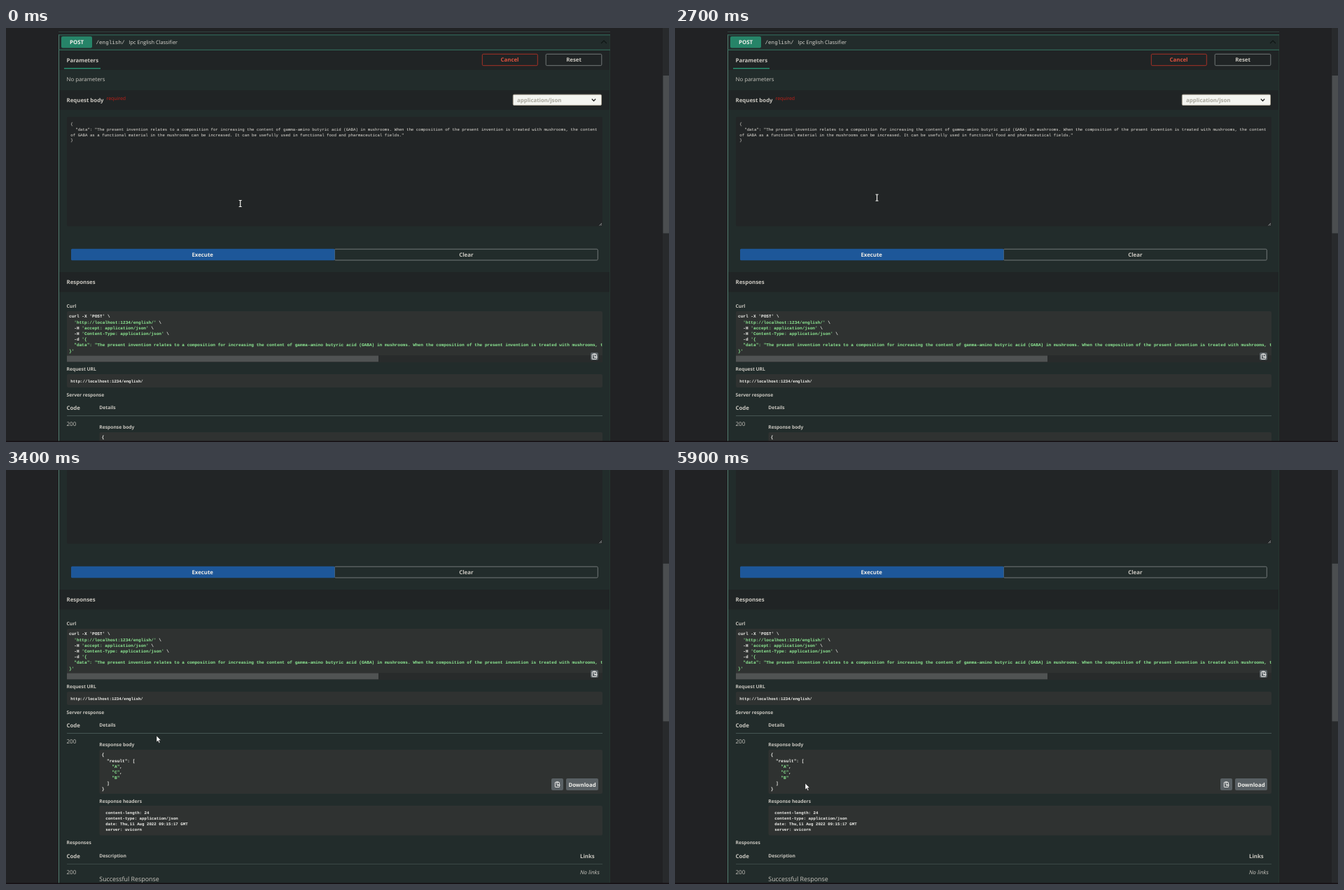
An HTML page with a canvas for the animation above (6000 ms loop, 947 px wide and 592 px high).

```html
<!DOCTYPE html>
<html lang="en">
<head>
<meta charset="utf-8">
<title>API docs</title>
<style>
html, body { margin: 0; width: 100%; height: 100%; overflow: hidden; background: #212224; }
canvas { display: block; width: 947px; height: 592px; }
</style>
</head>
<body>
<canvas id="stage" width="947" height="592"></canvas>
<script>
const ctx = document.getElementById('stage').getContext('2d');
const LOOP = 6000, STEP = 100;
const UI = '"Open Sans", "Noto Sans", sans-serif';
const MONO = '"Liberation Mono", "DejaVu Sans Mono", monospace';
const INK = '#c9c6bf', GREEN = '#8eea94', WHITE = '#f2f2ee', PANEL = '#2f3231';
const CODE = 6.11, PLAIN = 5.75, CHAR = CODE * 0.6, LINE = 8.17;

const abstract = ['The present invention relates to a composition for increasing the content of',
  'gamma-amino butyric acid (GABA) in mushrooms. When the composition of the present',
  'invention is treated with mushrooms, the content'].join(' ');
const bodyLines = ['{', '  "data": "' + abstract,
  'of GABA as a functional material in the mushrooms can be increased. It can be usefully used in functional food and pharmaceutical fields."',
  '}'];
// Each code line is a white part followed by a green part and a white tail.
const curlLines = [
  ["curl -X 'POST' \\"],
  ['  ', "'http://localhost:1234/english/'", ' \\'],
  ['  -H ', "'accept: application/json'", ' \\'],
  ['  -H ', "'Content-Type: application/json'", ' \\'],
  ['  -d ', "'{"],
  ['', '  "data": "' + abstract],
  ['', "}'"]
];
const resultLines = [['{'], ['  "result": ['], ['    ', '"A"', ','], ['    ', '"C"', ','],
  ['    ', '"B"'], ['  ]'], ['}']];
const headerLines = ['content-length: 24', 'content-type: application/json',
  'date: Thu,11 Aug 2022 09:15:17 GMT', 'server: uvicorn'];

const scrollKeys = [[2700, 0], [3100, 99.5], [3300, 178]];
const pointerKeys = [[400, 334.7, 251], [1300, 288.5, 328], [2000, 288.5, 328], [2500, 288.5, 242.6],
  [3100, 288.5, 242.6], [3400, 215, 380], [4100, 139, 408], [4200, 139, 408], [4500, 163, 440],
  [4900, 146, 456], [5200, 146, 456], [5700, 186, 448]];
const selectKeys = [[4200, 0], [4500, 21], [4900, 47]];

function track(keys, t) {
  const next = keys.findIndex(k => k[0] >= t);
  if (next === 0) return keys[0].slice(1);
  if (next < 0) return keys[keys.length - 1].slice(1);
  const a = keys[next - 1], b = keys[next], p = (t - a[0]) / (b[0] - a[0]);
  return a.slice(1).map((v, i) => v + (b[i + 1] - v) * p);
}

function rect(x, y, w, h, fill) {
  ctx.fillStyle = fill;
  ctx.fillRect(x, y, w, h);
}

function round(x, y, w, h, r, fill, stroke) {
  ctx.beginPath();
  ctx.roundRect(x, y, w, h, r);
  if (fill) { ctx.fillStyle = fill; ctx.fill(); }
  if (stroke) { ctx.strokeStyle = stroke; ctx.lineWidth = 1; ctx.stroke(); }
}

function path(points, fill, stroke, width = 1, close = false) {
  ctx.beginPath();
  points.forEach(([x, y]) => ctx.lineTo(x, y));
  if (close) ctx.closePath();
  if (fill) { ctx.fillStyle = fill; ctx.fill(); }
  if (stroke) { ctx.strokeStyle = stroke; ctx.lineWidth = width; ctx.stroke(); }
}

// y is the optical middle of the line.
function write(str, x, y, size, { color = INK, style = 'bold', family = UI, align = 'left' } = {}) {
  ctx.font = `${style} ${size}px ${family}`;
  ctx.textAlign = align;
  ctx.fillStyle = color;
  ctx.fillText(str, x, y + size * 0.36);
}

const heading = (str, x, y) => write(str, x, y, 7.84);
const label = (str, x, y) => write(str, x, y, 6.72);
const centered = (str, x, y, color = INK) => write(str, x, y, 7.84, { color, align: 'center' });
const mono = (str, x, y, size, color = WHITE, style = 'bold') =>
  write(str, x, y, size, { color, style, family: MONO });

function codeBlock(lines, x, y) {
  lines.forEach((parts, row) => {
    let column = 0;
    parts.forEach((part, i) => {
      mono(part, x + column * CHAR, y + row * LINE, CODE, i === 1 ? GREEN : WHITE);
      column += part.length;
    });
  });
}

function copyButton(x, y, size) {
  round(x, y, size, size, 2, '#596064');
  ctx.save();
  ctx.translate(x + size / 2, y + size / 2 + 0.3);
  round(-3.2, -3.2, 6.2, 6.8, 0.5, null, '#e8e8e6');
  rect(-1.8, -4.3, 3.4, 1.8, '#e8e8e6');
  rect(-1.8, -1.3, 2.6, 0.8, '#e8e8e6');
  rect(0, 0.2, 4, 1.1, '#e8e8e6');
  path([[1.3, -1], [-0.7, 0.7], [1.3, 2.4]], '#e8e8e6');
  ctx.restore();
}

function drawSelection(count, x, y) {
  for (const [row, parts] of resultLines.entries()) {
    const length = parts.join('').length + (row < resultLines.length - 1 ? 1 : 0);
    const used = Math.min(length, count);
    if (used <= 0) return;
    rect(x, y + row * LINE, used * CHAR, LINE + 0.2, '#0b51ad');
    count -= used;
  }
}

function drawRequest() {
  rect(75, 5, 788, 1, '#30433f');
  rect(75, 9.4, 788, 1000, '#222c2b');
  rect(75, 9.4, 1, 1000, '#527b6e');
  rect(862, 9.4, 1, 1000, '#25352f');
  rect(75, 9.4, 788, 1, '#34725f');
  rect(75, 30.8, 788, 1, '#34725f');
  round(79, 12, 44, 16.5, 2, '#268468');
  centered('POST', 101, 20, '#f0efeb');
  write('/english/', 128.5, 20, 7.6, { style: 'normal', family: MONO, color: '#dad7d0' });
  write('Ipc English Classifier', 175.5, 20, 7.4, { style: 'normal', color: '#dad7d0' });
  path([[850, 22], [854, 18], [858, 22]], null, '#101716', 1.2);

  rect(76, 32, 786, 28, '#202425');
  heading('Parameters', 86.5, 46);
  rect(83, 57, 52, 1.6, '#28896b');
  round(680.3, 37.3, 79, 16.4, 1.5, null, '#a63126');
  centered('Cancel', 719.5, 45.5, '#e0523f');
  round(771.2, 37.3, 79.6, 16.4, 1.5, null, '#727878');
  centered('Reset', 811, 45.5);
  write('No parameters', 86.5, 73, 7.84, { style: 'normal' });

  rect(76, 89, 786, 28, '#202425');
  heading('Request body', 86.5, 103);
  write('required', 143.5, 101, 6.9, { style: 'normal', color: '#c51f17' });
  round(724.3, 95.2, 126.2, 15.2, 1.5, '#f4f4f0', '#aaa394');
  write('application/json', 730, 102.7, 7.84, { color: '#a9a79d' });
  path([[836.8, 101.5], [839.5, 104.3], [842.2, 101.5]], null, '#222', 1.3);

  round(87, 127, 765, 156.5, 2, '#222526');
  [136.5, 144.8, 152.5, 160].forEach((y, i) => mono(bodyLines[i], 92.3, y, PLAIN, '#e2dfd8', 'normal'));
  path([[847.5, 282.5], [851, 279]], null, '#8d9291');
  path([[849.5, 282.5], [851, 281]], null, '#8d9291');

  round(469.3, 316.2, 376, 15.8, 1.5, null, '#727878');
  round(93, 315.8, 376.5, 16.5, 1.5, '#1d5799');
  centered('Execute', 280.7, 324, '#eceae5');
  centered('Clear', 657.3, 324);
}

function drawResponses(selected) {
  rect(76, 349, 786, 28.5, '#202425');
  heading('Responses', 86.5, 363.2);
  label('Curl', 86.5, 398);
  round(87, 405, 765, 73, 2, PANEL);
  ctx.save();
  ctx.beginPath();
  ctx.rect(87, 405, 764.5, 73);
  ctx.clip();
  codeBlock(curlLines, 90, 412.3);
  ctx.restore();
  rect(87, 468, 765, 10, '#282b2b');
  rect(87, 468.5, 445, 8.8, '#505353');
  copyButton(835, 464, 11);

  label('Request URL', 86.5, 488);
  round(87, 495, 765, 19, 2, PANEL);
  mono('http://localhost:1234/english/', 92.3, 504.5, PLAIN);
  label('Server response', 86.5, 524.2);
  heading('Code', 86.5, 543);
  label('Details', 133.3, 543);
  rect(87, 554, 765, 1, '#465553');
  write('200', 86.5, 566, 8, { style: 'normal' });

  label('Response body', 133.3, 571);
  round(133.5, 578, 718.5, 63, 2, PANEL);
  drawSelection(selected, 136.5, 581.2);
  codeBlock(resultLines, 136.7, 585.2);
  copyButton(779, 619, 17);
  round(800, 619, 46, 17, 2, '#596064');
  centered('Download', 823, 627.7, '#f0efeb');

  label('Response headers', 133.3, 651.3);
  round(133.5, 658, 718.5, 42.5, 2, PANEL);
  headerLines.forEach((line, i) => mono(line, 142.3, 668.2 + i * 7.75, PLAIN));

  label('Responses', 86.5, 711);
  heading('Code', 86.5, 730);
  label('Description', 133.3, 730);
  heading('Links', 820, 730);
  rect(87, 741, 765, 1, '#3b4846');
  write('200', 86.5, 753, 8, { style: 'normal' });
  write('No links', 820, 753, 7.9, { style: 'italic' });
  write('Successful Response', 133.3, 762.3, 8.9, { style: 'normal' });
}

function drawBeam() {
  path([[-2, -4.5], [2, -4.5]], null, WHITE);
  path([[-2, 4.5], [2, 4.5]], null, WHITE);
  path([[0, -4.5], [0, 4.5]], null, WHITE, 1.2);
}

function drawArrow() {
  path([[0, 0], [0, 9], [2.1, 7.2], [3.6, 10.5], [5, 9.8], [3.5, 6.6], [6.3, 6.4]],
    '#fff', '#151515', 0.5, true);
}

function drawHand() {
  path([[-1.4, -5], [0, -5], [0.3, -1.5], [3.8, -0.6], [4, 2], [3, 5.5], [-1.3, 5.5],
    [-4, 1.5], [-3.2, 0.6], [-1.5, 2]], '#fff', '#151515', 0.6, true);
}

function drawPointer(t) {
  const [x, y] = track(pointerKeys, t);
  ctx.save();
  ctx.translate(x, y);
  if (t >= 4200 && t < 5000) {
    ctx.beginPath();
    ctx.arc(0, 0, 11.2, 0, Math.PI * 2);
    ctx.fillStyle = '#fde133';
    ctx.fill();
  } else if (t > 3100) drawArrow();
  else if (y > 315) drawHand();
  else if (y > 283) drawArrow();
  else drawBeam();
  ctx.restore();
}

function render(t) {
  const [scroll] = track(scrollKeys, t);
  const selected = t < 5400 ? Math.floor(track(selectKeys, t)[0]) : 0;
  rect(0, 0, 947, 592, '#212224');
  ctx.save();
  ctx.translate(0, -Math.round(scroll * 2) / 2);
  drawRequest();
  drawResponses(selected);
  ctx.restore();
  rect(938, 0, 9, 592, '#282a2c');
  rect(938.5, 68 + scroll * 0.37, 8.5, 225.5, '#4b4e50');
  rect(0, 590.5, 947, 1.5, '#150f13');
  drawPointer(t);
}

function tick(now) {
  render(Math.floor(now % LOOP / STEP) * STEP);
  requestAnimationFrame(tick);
}

ctx.textRendering = 'geometricPrecision';
render(0);
requestAnimationFrame(tick);
</script>
</body>
</html>
```
